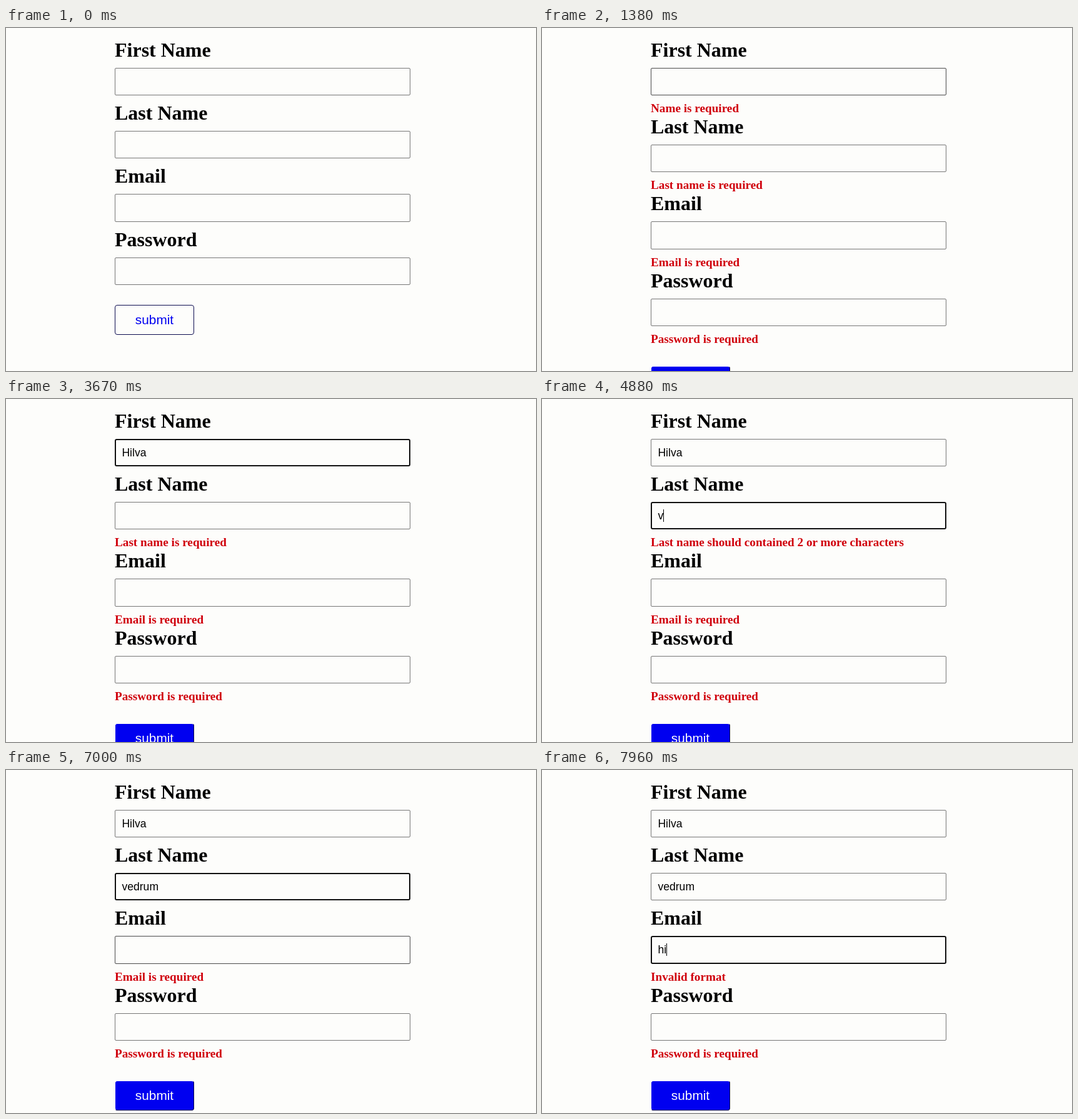
Recreate the animation shown at these times as an HTML page. Size 848 by 550 pixels, loop 8 s.

```html
<!DOCTYPE html>
<html lang="en">
<head>
<meta charset="utf-8">
<title>Form validation</title>
<style>
html, body { margin: 0; width: 100%; height: 100%; overflow: hidden; background: #fdfdfb; }
body { position: relative; }
body > div { position: absolute; left: 174px; box-sizing: border-box; white-space: pre; }
.label { font: bold 32px/36px "Liberation Serif", "Times New Roman", serif; color: #000; }
.error { font: bold 19.2px/21px "Liberation Serif", "Times New Roman", serif; color: #d0000c; }
.field {
  width: 473px; height: 44.4px; border: 1px solid #767676; border-radius: 2px;
  padding-left: 10.4px; font: 17.6px/42.4px "Liberation Sans", Arial, sans-serif; color: #000;
}
.field.hover { border-color: #4a4a4a; }
.field.focus { border: 2px solid #101010; border-radius: 3px; padding-left: 9.4px; line-height: 40.4px; }
.caret { display: none; width: 1px; height: 20px; background: #000; vertical-align: -4px; }
.focus .caret.on { display: inline-block; }
#button {
  width: 127px; height: 48px; border: 1px solid #0c0c50; border-radius: 4px; text-align: center;
  font: 20.8px/46px "Liberation Sans", Arial, sans-serif;
}
#tip { left: 274px; top: 111px; width: 47px; height: 50px; }
</style>
</head>
<body>
<div id="button">submit</div>
<script>
const LOOP = 8000, SUBMIT = 630;

// keys: when each letter is typed; hover and focus: [start, end]
const rows = [
  { label: "First Name", name: "Name", text: "Hilva", keys: [2420, 2830, 2900, 2990, 3080],
    hover: [1250, 4130], focus: [1710, 4330] },
  { label: "Last Name", name: "Last name", text: "vedrum", keys: [4750, 5080, 5130, 5750, 5880, 6080],
    hover: [4130, 7000], focus: [4330, 7250] },
  { label: "Email", name: "Email", text: "hi", keys: [7750, 7880],
    hover: [7000, LOOP], focus: [7250, LOOP], email: true },
  { label: "Password", name: "Password", text: "", keys: [], hover: [0, 0], focus: [0, 0] }
];
const caretOff = [[3670, 4330], [5580, 5750], [6580, 7080]];

const within = (t, [a, b]) => t >= a && t < b;
const mix = (a, b, p) => `rgb(${a.map((v, i) => Math.round(v + (b[i] - v) * p))})`;

function add(cls, text = "") {
  const el = document.createElement("div");
  el.className = cls;
  el.textContent = text;
  document.body.append(el);
  return el;
}

for (const row of rows) {
  row.labelEl = add("label", row.label);
  row.errorEl = add("error");
  row.fieldEl = add("field");
  row.value = document.createElement("span");
  row.caret = document.createElement("span");
  row.fieldEl.append(row.value, row.caret);
}

const tip = add("");
tip.id = "tip";
tip.innerHTML = `<svg width="47" height="50" style="display:block">
  <path d="M3 8H9L21 0L33 8H44Q47 8 47 11V47Q47 50 44 50H3Q0 50 0 47V11Q0 8 3 8Z" fill="#8c8c6e" fill-opacity=".5"/>
  <text x="12" y="35" font-family="Liberation Sans, sans-serif" font-size="14" fill="#e8e8da">h</text></svg>`;

function message(row, t, value) {
  if (t < SUBMIT) return "";
  if (!value) return row.name + " is required";
  if (row.email) return "Invalid format";
  return value.length < 2 ? row.name + " should contained 2 or more characters" : "";
}

function draw(t) {
  let y = 63.7, buttonTop;
  const blink = caretOff.some(span => within(t, span));
  for (const row of rows) {
    const value = row.text.slice(0, row.keys.filter(k => t >= k).length);
    const error = message(row, t, value);
    const focus = within(t, row.focus);
    row.value.textContent = value;
    row.errorEl.textContent = error;
    row.caret.className = blink ? "caret" : "caret on";
    row.fieldEl.className = "field" + (focus ? " focus" : within(t, row.hover) ? " hover" : "");
    row.labelEl.style.top = y - 47 + "px";
    row.fieldEl.style.top = y + "px";
    row.errorEl.style.top = y + 54.2 + "px";
    buttonTop = y + (error ? 108.4 : 76.4);
    y += error ? 123.3 : 101.3;
  }

  const p = Math.min(1, Math.max(0, (t - SUBMIT) / 300));
  const fade = p * p * (3 - 2 * p);
  const paper = [253, 253, 251], blue = [0, 0, 240];
  const style = document.getElementById("button").style;
  style.top = buttonTop + "px";
  style.backgroundColor = mix(paper, blue, fade);
  style.color = mix(blue, paper, fade);
  // raised edge: only the top and left sides turn light
  style.borderTopColor = style.borderLeftColor = mix([12, 12, 80], paper, fade);

  tip.style.opacity = t < 2040 ? 0 : Math.min(1, Math.max(0, (3040 - t) / 250));
}

function frame() {
  draw(performance.now() % LOOP);
  requestAnimationFrame(frame);
}
frame();
</script>
</body>
</html>
```
